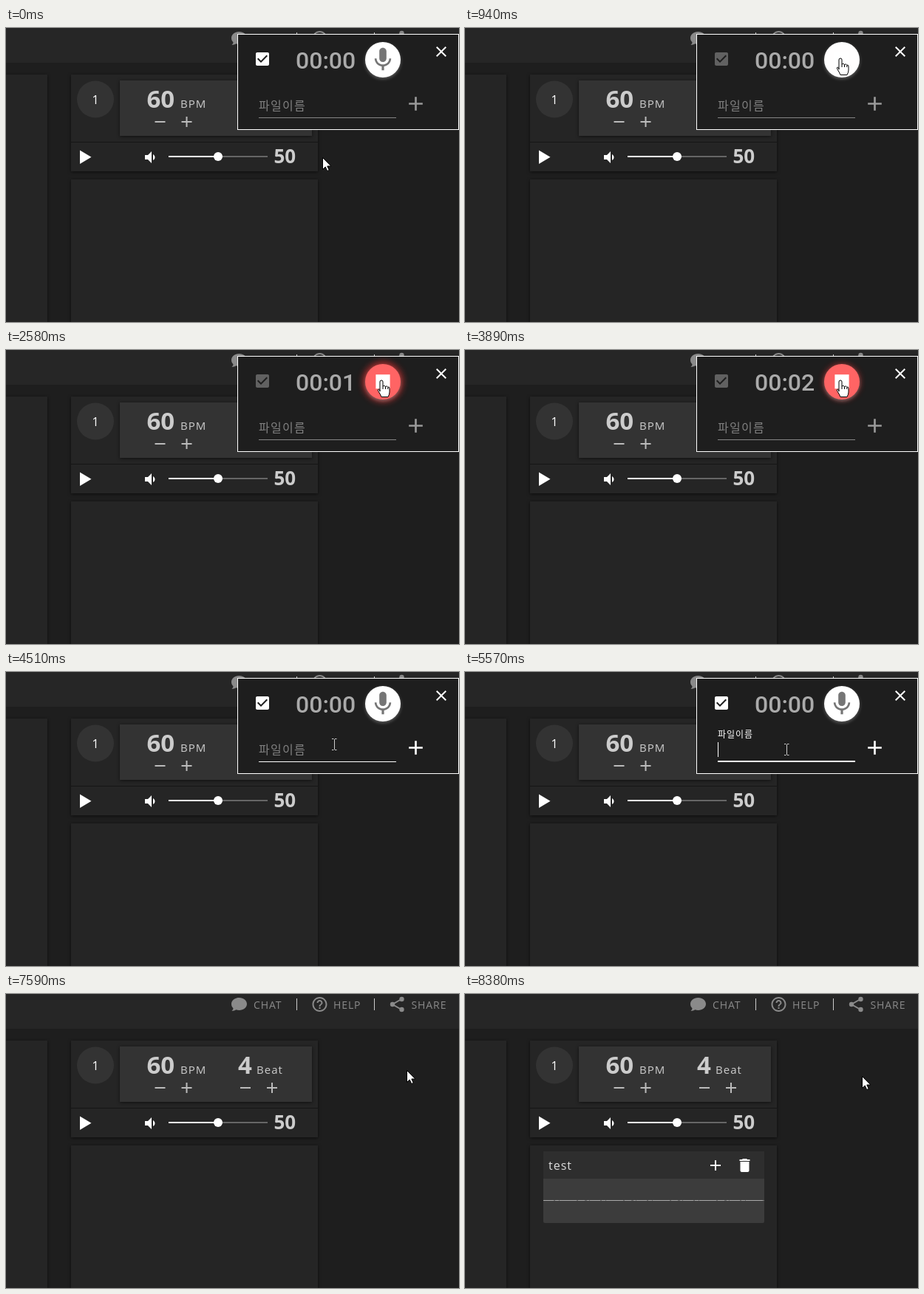
These frames come from a looping animation (613 px wide and 398 px high, 9100 ms). An HTML page:

```html
<!DOCTYPE html>
<html lang="ko">
<head>
<meta charset="utf-8">
<style>
html, body { margin: 0; width: 100%; height: 100%; overflow: hidden; background: #1e1e1e; }
svg { display: block; font-family: "Open Sans", "Noto Sans CJK KR", sans-serif; }
.panel { fill: #252525; filter: drop-shadow(0 1px 2px #0009); }
.big { font-weight: 700; font-size: 33px; fill: #ccc; }
.unit { font-size: 15px; letter-spacing: 1px; fill: #ccc; }
.menu { font-size: 14px; letter-spacing: .9px; }
</style>
</head>
<body>
<svg width="613" height="398" viewBox="0 0 613 398">
  <defs>
    <path id="add" d="M19 13h-6v6h-2v-6H5v-2h6V5h2v6h6v2z"/>
    <path id="minus" d="M19 13H5v-2h14v2z"/>
    <filter id="blur" x="-50%" y="-50%" width="200%" height="200%"><feGaussianBlur stdDeviation="4"/></filter>
    <filter id="soft" x="-50%" y="-50%" width="200%" height="200%"><feGaussianBlur stdDeviation="2"/></filter>
  </defs>
  <rect width="613" height="398" fill="#1e1e1e"/>
  <rect width="613" height="47" fill="#262626"/>
  <g fill="#8a8a8a">
    <path d="M315.500 5c6 0 10.500 3.700 10.500 8.500s-4.500 8.500-10.500 8.500c-1.500 0-3-.2-4.300-.7-1.500 1-3.300 1.600-5.700 1.700 1.300-1.200 1.900-2.400 2-3.700-1.600-1.500-2.500-3.500-2.500-5.800 0-4.800 4.500-8.500 10.500-8.500z"/>
    <text class="menu" x="335" y="20">CHAT</text>
    <path transform="translate(412.500 2)" d="M11 18h2v-2h-2v2zm1-16C6.480 2 2 6.480 2 12s4.480 10 10 10 10-4.480 10-10S17.520 2 12 2zm0 18c-4.410 0-8-3.590-8-8s3.590-8 8-8 8 3.590 8 8-3.590 8-8 8zm0-14c-2.210 0-4 1.790-4 4h2c0-1.100.9-2 2-2s2 .9 2 2c0 2-3 1.750-3 5h2c0-2.250 3-2.500 3-5 0-2.210-1.790-4-4-4z"/>
    <text class="menu" x="443" y="20">HELP</text>
    <g transform="translate(517 2)">
      <path d="M18 5L6 12l12 7" fill="none" stroke="#8a8a8a" stroke-width="2"/>
      <circle cx="18.500" cy="5" r="3.200"/><circle cx="6" cy="12" r="3.200"/><circle cx="18.500" cy="19" r="3.200"/>
    </g>
    <text class="menu" x="548.500" y="20">SHARE</text>
    <path d="M393 6h1v16h-1zM498 6h1v16h-1z" fill="#ccc"/>
  </g>

  <rect class="panel" x="-10" y="63" width="66" height="345"/>
  <rect class="panel" x="88" y="63" width="334" height="131"/>
  <rect class="panel" x="88" y="205" width="334" height="203"/>
  <rect x="88" y="154" width="334" height="1" fill="#151515"/>
  <circle cx="121" cy="96.500" r="25" fill="#333"/>
  <text x="121" y="102.500" font-size="16" text-anchor="middle" fill="#fff">1</text>
  <rect class="panel" x="154" y="71" width="260" height="75" style="fill:#333"/>
  <text class="big" x="190.500" y="108">60</text><text class="unit" x="236" y="108">BPM</text>
  <text class="big" x="314" y="108">4</text><text class="unit" x="339" y="108">Beat</text>
  <g fill="#bbb">
    <use href="#minus" x="196.500" y="115"/><use href="#add" x="232.500" y="115"/>
    <use href="#minus" x="312" y="115"/><use href="#add" x="348" y="115"/>
  </g>
  <path d="M100 165.500v18.500l15.500-9.250z" fill="#fff"/>
  <path transform="translate(183 163)" fill="#fff" d="M18.500 12c0-1.770-1.020-3.290-2.500-4.030v8.050c1.480-.73 2.500-2.250 2.500-4.020zM5 9v6h4l5 5V4L9 9H5z"/>
  <rect x="287" y="173" width="67" height="2" fill="#666"/>
  <rect x="220" y="173" width="67" height="2" fill="#fff"/>
  <circle cx="287" cy="174" r="6" fill="#fff"/>
  <text class="big" x="362.500" y="183" style="font-size:26px">50</text>

  <g id="item">
    <rect id="track" x="106" y="213" width="299" rx="2" fill="#3c3c3c"/>
    <rect x="106" y="213" width="299" height="37" fill="#2e2e2e"/>
    <text x="113" y="238" font-size="16" letter-spacing="1" fill="#ddd">test</text>
    <use href="#add" x="327" y="220" fill="#fff"/>
    <path transform="translate(366.500 220)" fill="#fff" d="M6 19c0 1.100.9 2 2 2h8c1.100 0 2-.9 2-2V7H6v12zM19 4h-3.500l-1-1h-5l-1 1H5v2h14V4z"/>
    <g id="wave" fill="none">
      <path d="M106 279.500h299" stroke="#777"/>
      <path d="M106 279.500h299" stroke="#aaa" stroke-dasharray="14 2 5 1 23 2 9 3 3 1"/>
    </g>
  </g>

  <g id="dialog">
    <rect x="313.500" y="8.500" width="299" height="129" fill="#1e1e1e" stroke="#fff"/>
    <path id="check" transform="translate(335 30)" d="M19 3H5c-1.110 0-2 .9-2 2v14c0 1.100.89 2 2 2h14c1.110 0 2-.9 2-2V5c0-1.100-.89-2-2-2zm-9 14l-5-5 1.410-1.410L10 14.170l7.590-7.590L19 8l-9 9z"/>
    <text id="timer" x="392" y="55" font-size="32" fill="#aaa" style="font-family:Roboto,sans-serif;font-weight:500"></text>
    <circle id="glow" cx="510" cy="43" fill="#f33" filter="url(#blur)"/>
    <circle cx="510" cy="45" r="24" fill="#999" opacity=".5" filter="url(#soft)"/>
    <circle id="button" cx="510" cy="43" r="24"/>
    <g transform="translate(490.800 23.600) scale(1.600)">
      <path id="mic" fill="#757575" d="M12 14c1.660 0 2.990-1.340 2.990-3L15 5c0-1.660-1.340-3-3-3S9 3.340 9 5v6c0 1.660 1.340 3 3 3zm5.300-3c0 3-2.540 5.100-5.300 5.100S6.700 14 6.700 11H5c0 3.410 2.720 6.230 6 6.720V21h2v-3.280c3.280-.48 6-3.300 6-6.720h-1.700z"/>
      <path id="stop" fill="#fff" d="M6 6h12v12H6z"/>
    </g>
    <path transform="translate(577 20)" fill="#fff" d="M19 6.410L17.590 5 12 10.590 6.410 5 5 6.410 10.590 12 5 17.590 6.410 19 12 13.410 17.590 19 19 17.590 13.410 12z"/>
    <use id="plus" href="#add" transform="translate(538.500 86.500) scale(1.333)"/>
    <text id="label" font-size="16" letter-spacing="1.280">파일이름</text>
    <text id="typed" x="342" y="111" font-size="16" fill="#fff"></text>
    <rect id="line" x="342" y="121" width="186" height="1"/>
    <rect id="focus" y="120" height="2" fill="#fff"/>
    <rect id="caret" y="95" width="1" height="20" fill="#fff"/>
  </g>

  <g id="cursor">
    <path id="arrow" d="M.5.500v16l3.700-3.500 2.500 5.500 2.600-1.100-2.500-5.400h5z" fill="#fff" stroke="#000"/>
    <g id="hand" stroke="#000" stroke-linejoin="round">
      <path fill="#fff" d="M-2 15V2a2 2 0 0 1 4 0V8q2-1.800 3.500.5q2-1.500 3.300.7q2.200-.7 2.200 1.800V16q0 3-2 6.500H0q-1-3-4.300-8q-1-2.500 1-2.500q.8.500 1.300 3z"/>
      <path d="M2 8v4M5.500 8.500V12M8.800 9.500V12" fill="none"/>
    </g>
    <path id="beam" fill="none" stroke="#ccc" d="M-3-7.500h2.500M1-7.500h2.500M.500-7v14M-3 7.500h2.500M1 7.500h2.500"/>
  </g>
</svg>
<script>
const LOOP = 9100, START = 940, STOP = 3920, FOCUS = 4640, CLOSE = 7460;
const KEYS = [5760, 5880, 6060, 6180];
const BLINKS = [FOCUS, 5060, 5570, 6720, 7260];
const PATH = [
  [230, 428, 175], [520, 511, 35], [610, 508, 41], [4130, 508, 41], [4610, 436, 105],
  [5389, 436, 105], [5390, 435, 105], [6590, 435, 105], [6800, 480, 101], [7060, 542, 103],
  [8320, 542, 103], [8380, 537, 111]
];
const $ = id => document.getElementById(id);
const set = (id, attrs) => { for (const k in attrs) $(id).setAttribute(k, attrs[k]); };
const show = (id, on) => set(id, { visibility: on ? "inherit" : "hidden" });
const ramp = (t, from, length) => Math.min(1, Math.max(0, (t - from) / length));
const ease = p => p * p * (3 - 2 * p);
const mix = (a, b, p) => a + (b - a) * p;
const gray = v => `rgb(${v},${v},${v})`;
const passed = (times, t) => times.filter(s => s <= t).length;

function pointer(t) {
  const i = PATH.findIndex(p => p[0] > t);
  if (i === 0) return PATH[0].slice(1);
  if (i < 0) return PATH[PATH.length - 1].slice(1);
  const [a, b] = [PATH[i - 1], PATH[i]];
  const p = ease(ramp(t, a[0], b[0] - a[0]));
  return [Math.round(mix(a[1], b[1], p)), Math.round(mix(a[2], b[2], p))];
}

function drawCursor(t) {
  const [x, y] = pointer(t);
  const open = t < 7580;
  const near = (cx, cy) => Math.hypot(x - cx, y - cy) < 24;
  const hand = open && (near(510, 43) || near(554, 102));
  const beam = open && !hand && x > 342 && x < 528 && y > 88 && y < 122;
  set("cursor", { transform: `translate(${x} ${y})` });
  show("hand", hand);
  show("beam", beam);
  show("arrow", !hand && !beam);
  return beam;
}

function drawRecorder(t) {
  const recording = t >= START && t < STOP;
  const red = ramp(t, START, 250) - ramp(t, STOP, 250);
  const pulse = (1 - Math.cos((t - START) / 1000 * 2 * Math.PI)) / 2;
  $("timer").textContent = "00:0" + (recording ? Math.floor((t - START) / 1000) : 0);
  set("check", { fill: recording ? "#616161" : "#fff" });
  set("button", { fill: `rgb(255,${mix(255, 100, red)},${mix(255, 100, red)})` });
  set("glow", { r: mix(24, 28, pulse), opacity: .6 * red });
  set("plus", { fill: t < STOP ? "#999" : "#fff" });
  show("mic", !recording);
  show("stop", recording);
}

function drawField(t, hovered) {
  const p = ease(ramp(t, FOCUS, 190));
  set("label", {
    transform: `translate(342 ${mix(111, 88.5, p)}) scale(${mix(1, .75, p)})`,
    fill: gray(mix(128, 255, p))
  });
  set("line", { fill: hovered || t >= FOCUS ? "#fff" : "#858585" });
  set("focus", { x: 435 - 93 * p, width: 186 * p });
  $("typed").textContent = "test".slice(0, passed(KEYS, t));
  set("caret", { x: 342 + Math.round($("typed").getComputedTextLength()) });
  show("caret", passed(BLINKS, t) % 2);
}

function frame(now) {
  const t = now % LOOP;
  const hovered = drawCursor(t);
  drawRecorder(t);
  drawField(t, hovered);
  set("dialog", { opacity: 1 - ramp(t, CLOSE, 120) });
  show("item", t >= 7640);
  set("track", { height: t < 7700 ? 113 : 97 });
  show("wave", t >= 7700);
  requestAnimationFrame(frame);
}
requestAnimationFrame(frame);
</script>
</body>
</html>
```
